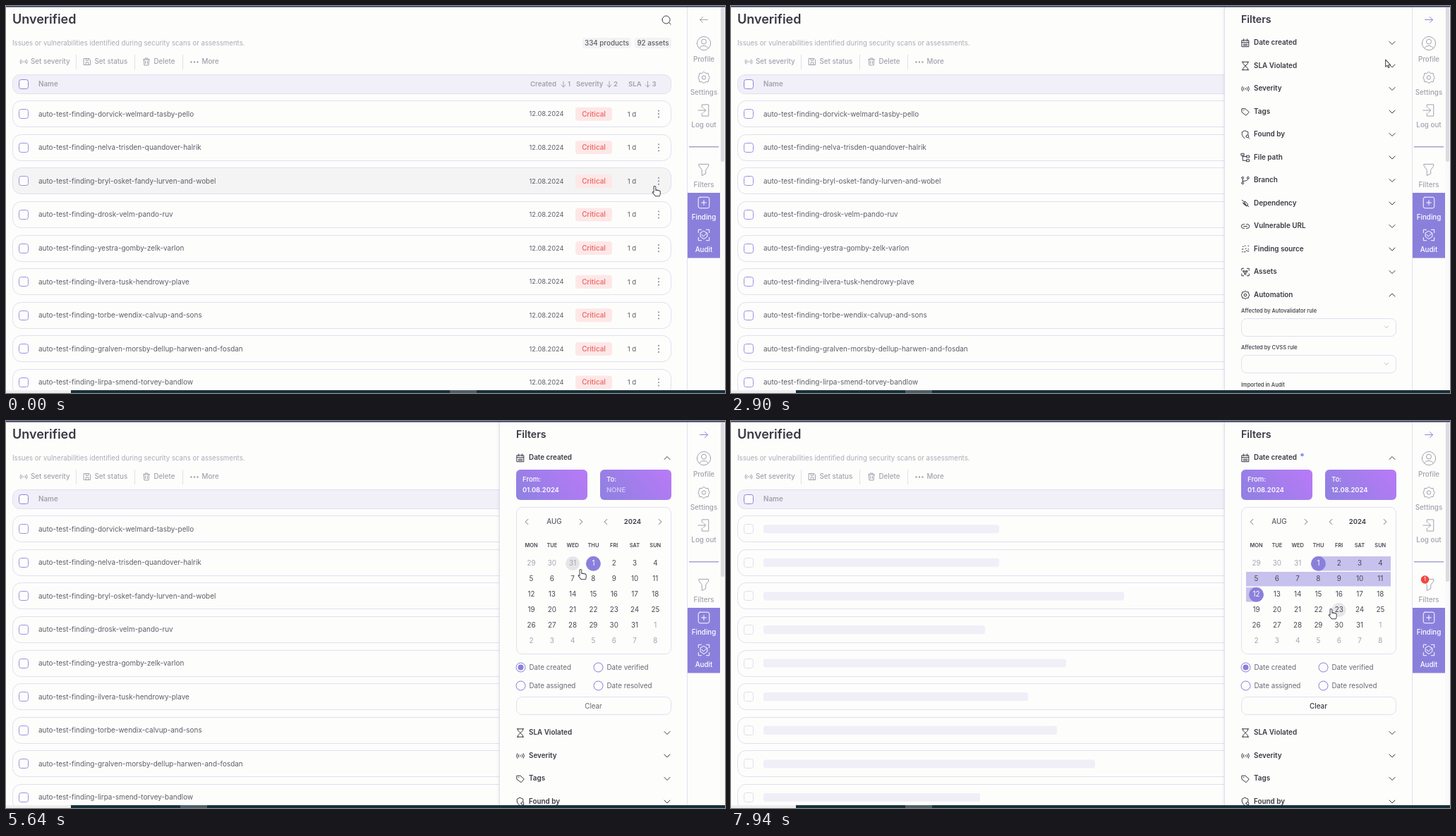
An HTML page with a canvas for the animation above (8 s loop, 1019 by 549 pixels).

```html
<!DOCTYPE html>
<html lang="en">
<head>
<meta charset="utf-8">
<title>Unverified findings</title>
<style>
html, body { margin: 0; width: 100%; height: 100%; overflow: hidden; background: #fdfdfc; }
canvas { display: block; width: 1019px; height: 549px; }
</style>
</head>
<body>
<canvas id="stage"></canvas>
<script>
const W = 1019, H = 549, LOOP = 8000;
const cv = document.getElementById('stage'), c = cv.getContext('2d');
const dpr = window.devicePixelRatio || 1;
cv.width = W * dpr;
cv.height = H * dpr;

const BG = '#fdfdfc', INK = '#3b3843', GREY = '#a3a0ad', PURPLE = '#8a80dc', LINE = '#e1dff0';
const OPEN = 675, EXPAND = 3300, FROM = 5250, TO = 6330, FILL = 6700, LOAD = 6900;

const findings = [
  'dorvick-welmard-tasby-pello', 'nelva-trisden-quandover-halrik',
  'bryl-osket-fandy-lurven-and-wobel', 'drosk-velm-pando-ruv',
  'yestra-gomby-zelk-varlon', 'ilvera-tusk-hendrowy-plave',
  'torbe-wendix-calvup-and-sons', 'gralven-morsby-dellup-harwen-and-fosdan',
  'lirpa-smend-torvey-bandlow'
];
const bones = [380, 380, 557, 360, 475, 421, 462, 516, 353];

const sections = [
  ['Date created', 'calendar'], ['SLA Violated', 'hourglass'], ['Severity', 'signal'],
  ['Tags', 'tag'], ['Found by', 'shield'], ['File path', 'tree'], ['Branch', 'branch'],
  ['Dependency', 'plug'], ['Vulnerable URL', 'link'], ['Finding source', 'dots'],
  ['Assets', 'frame'], ['Automation', 'gear'], ['Assignee', 'tag'], ['Tickets', 'link']
];

const glyphs = {
  calendar: 'M-5-4h10v9.5h-10zM-5-1h10M-2.5-6v3M2.5-6v3M-3 1.5h6M-3 3.5h6',
  hourglass: 'M-5-6h10M-5 6h10M-3.5-6v2.5L3.5 3.5V6M3.5-6v2.5L-3.5 3.5V6',
  signal: 'M-4.5-3.5q-2.5 3.5 0 7M4.5-3.5q2.5 3.5 0 7M-2.5-2q-1.5 2 0 4M2.5-2q1.5 2 0 4M-.6 0h1.2',
  tag: 'M-5-4.5h5l5.500 5-4.500 5-6-4.500zM-2.600-2h.4',
  shield: 'M4 0V-4L-1-6-5-4V0Q-4 4-1 5.500M1 2.500a2 2 0 1 0 4 0a2 2 0 1 0-4 0M4.500 4.500l1.500 1.500',
  tree: 'M-6-6h4v3h-4zM2-3h4v3h-4zM2 3h4v3h-4zM-4-3V4.500h6M-4-1.500h6',
  branch: 'M-5.500-4a1.500 1.500 0 1 0 3 0a1.500 1.500 0 1 0-3 0M2.500-4a1.500 1.500 0 1 0 3 0a1.500 1.500 0 1 0-3 0M-5.500 4a1.500 1.500 0 1 0 3 0a1.500 1.500 0 1 0-3 0M-4-2.500v5M4-2.500Q4 1-4 1',
  plug: 'M-5-5l2 2M5 5l-2-2M-3 0L0-3 4 2 2 4zM-2-3l3 6M-4-1l6 4',
  link: 'M-1.500-3h-1.500a3 3 0 0 0 0 6h1.500M1.500-3h1.500a3 3 0 0 1 0 6h-1.500M-2.500 0h5',
  dots: 'M-4-4h1M-1-5h1M4-5h1M-5 0h2M0-1h1M4 0h1M-2 4h2M3 3h2M-5 4h1M1 2h1',
  frame: 'M-5.500-2.500v-3h3M2.500-5.500h3v3M5.500 2.500v3h-3M-2.500 5.500h-3v-3M-3-2h2v2h-2zM1-2h2v2h-2zM-1 1.500h2v2h-2z',
  gear: 'M0-6L2-4.500 4.500-4.500 5-2 6 0 5 2 4.500 4.500 2 4.500 0 6-2 4.500-4.500 4.500-5 2-6 0-5-2-4.500-4.500-2-4.500zM-2 0a2 2 0 1 0 4 0a2 2 0 1 0-4 0',
  user: 'M-6 0a6 6 0 1 0 12 0a6 6 0 1 0-12 0M-2.200-1.500a2.200 2.200 0 1 0 4.400 0a2.200 2.200 0 1 0-4.400 0M-4 4Q0 0 4 4',
  exit: 'M-2-3v-3h7v12h-7v-3M-6 0h8M-.5-2.500L2 0l-2.500 2.500',
  funnel: 'M-5-6h10v2L2 0v4l-4 2V0L-5-4z',
  plus: 'M-4-6h8q2 0 2 2v8q0 2-2 2h-8q-2 0-2-2v-8q0-2 2-2zM-2.500 0h5M0-2.500v5',
  audit: 'M-5.500-2.500v-3h3M2.500-5.500h3v3M5.500 2.500v3h-3M-2.500 5.500h-3v-3M0-4L3.500-2V1.500L0 4-3.500 1.500V-2zM-2-.5l1.500 2L3-2',
  save: 'M-5-5h8l2 2v8h-10zM-2-5v3h4v-3M-2 5V1h4v4',
  bin: 'M-5-3.500h10M-2-3.500v-2h4v2M-4-3.500l.5 9h7l.5-9M-1.500-1v4M1.500-1v4',
  search: 'M-6-.5a5.500 5.500 0 1 0 11 0a5.500 5.500 0 1 0-11 0M3.500 3.500L6 6',
  arrow: 'M-5.500 0h11M1.500-4l4 4-4 4',
  sort: 'M0-4v8M-3 1l3 3 3-3',
  down: 'M-4-2l4 4 4-4'
};
for (const k in glyphs) glyphs[k] = new Path2D(glyphs[k]);

const hand = new Path2D('M-1 0Q1-1.500 2 .5V6Q3.500 4.500 4.500 6.200 6 5 7 6.800 8.500 6 9 8V11Q9 13.500 7.500 15H1.500L-3 9.500Q-3.500 7.500-1 9z');
const arrowCursor = new Path2D('M0 0V11L2.500 8.800 4.200 12.500 5.800 11.800 4.200 8.200H7.500z');

const clamp = (v) => Math.max(0, Math.min(1, v));
const smooth = (p) => p * p * (3 - 2 * p);

// Eased interpolation through [time, ...values] stops.
function track(stops, t) {
  if (t <= stops[0][0]) return stops[0].slice(1);
  for (let i = 1; i < stops.length; i++) {
    const a = stops[i - 1], b = stops[i];
    if (t < b[0]) {
      const p = smooth((t - a[0]) / (b[0] - a[0]));
      return a.slice(1).map((v, j) => v + (b[j + 1] - v) * p);
    }
  }
  return stops[stops.length - 1].slice(1);
}

const cursorPath = [
  [70, 919, 256], [570, 980, 238], [880, 980, 238], [1350, 895, 198], [2340, 895, 198],
  [3130, 936, 45], [3380, 936, 45], [3640, 871, 71], [4250, 846, 190], [4640, 855, 217],
  [5100, 832, 203], [5400, 832, 203], [6200, 749, 240], [6700, 749, 240], [7500, 850, 267]
];
const scrollPath = [[950, 238], [1900, 35], [2380, 35], [2700, 0]];
const clicks = [[640, 980, 238], [3270, 935, 43], [FROM - 40, 832, 202], [TO - 20, 749, 240]];

function text(s, x, y, size, color, weight = 400, align = 'left') {
  c.font = `${weight} ${size}px Inter, "Open Sans", sans-serif`;
  c.textAlign = align;
  c.fillStyle = color;
  c.fillText(s, x, y + size * 0.35);
}

function box(x, y, w, h, r, fill, stroke, lw = 1) {
  c.beginPath();
  c.roundRect(x, y, w, h, r);
  if (fill) { c.fillStyle = fill; c.fill(); }
  if (stroke) { c.strokeStyle = stroke; c.lineWidth = lw; c.stroke(); }
}

function disc(x, y, r, fill, stroke, lw = 1) {
  c.beginPath();
  c.arc(x, y, r, 0, Math.PI * 2);
  if (fill) { c.fillStyle = fill; c.fill(); }
  if (stroke) { c.strokeStyle = stroke; c.lineWidth = lw; c.stroke(); }
}

function rect(x, y, w, h, fill) {
  c.fillStyle = fill;
  c.fillRect(x, y, w, h);
}

function icon(name, x, y, color, scale = 1, turn = 0, lw = 1) {
  c.save();
  c.translate(x, y);
  c.rotate(turn);
  c.scale(scale, scale);
  c.strokeStyle = color;
  c.lineWidth = lw / scale;
  c.lineCap = c.lineJoin = 'round';
  c.stroke(glyphs[name]);
  c.restore();
}

function kebab(x, y, dx, dy, color, r) {
  for (let i = -1; i < 2; i++) disc(x + i * dx, y + i * dy, r, color);
}

function drawList(t, mx, my) {
  text('Unverified', 9, 19, 18, INK, 600);
  icon('search', 936, 20, INK);
  text('Issues or vulnerabilities identified during security scans or assessments.', 9, 52.5, 9.65, '#acaab6');
  box(817, 45, 69, 15, 4, '#f3f3f3');
  text('334 products', 851.5, 52.5, 9.8, '#5f5c68', 500, 'center');
  box(891, 45, 52, 15, 4, '#f3f3f3');
  text('92 assets', 917, 52.5, 9.8, '#5f5c68', 500, 'center');

  icon('signal', 25, 79, GREY, 0.85);
  text('Set severity', 35, 79, 9.8, GREY, 500);
  icon('save', 115, 79, GREY, 0.9);
  text('Set status', 125.5, 79, 9.8, GREY, 500);
  icon('bin', 199, 79, GREY, 0.9);
  text('Delete', 209.5, 79, 9.8, GREY, 500);
  kebab(267, 79.5, 4.5, 0, GREY, 1.2);
  text('More', 277.5, 79, 9.8, GREY, 500);
  for (const x of [99, 182, 250]) rect(x, 69, 1, 21, '#e2e0e8');

  box(9.5, 97.5, 933, 27, 10, '#f1f0f8', LINE);
  box(18.5, 104.5, 13, 13, 3, BG, PURPLE);
  text('Name', 46, 111, 9.8, GREY, 600);
  [['Created', 743, 790, 1], ['Severity', 808, 855, 2], ['SLA', 882, 909.5, 3]].forEach(([s, x, ax, n]) => {
    text(s, x, 111, 9.6, GREY, 600);
    icon('sort', ax, 111, GREY);
    text(n, ax + 6, 111, 9.6, GREY, 600);
  });

  const loading = t >= LOAD;
  findings.forEach((name, i) => {
    const y = 153.2 + 47.6 * i;
    const hover = !loading && t < OPEN && mx < 942 && Math.abs(my - y) < 19;
    box(9.5, Math.round(y - 19) + 0.5, 933, 37, 12, hover ? '#f4f4f4' : BG, LINE);
    box(18.5, Math.round(y - 7) + 0.5, 13, 13, 3, BG, loading ? '#e0deec' : '#9a92e0');
    if (loading) {
      box(46, y - 6, bones[i] - 46, 12, 3, '#f0eff8');
      return;
    }
    text('auto-test-finding-' + name, 46, y, 9.95, '#5f5c68');
    text('12.08.2024', 741.5, y, 9.3, '#5f5c68');
    box(807, y - 9.5, 52, 19, 4, '#fde8e7');
    text('Critical', 833, y, 9.8, '#ef7070', 600, 'center');
    text('1 d', 887, y, 9.6, '#5f5c68', 400, 'center');
    kebab(925, y, 0, 4.5, '#96939f', 1.1);
  });
}

function chevron(x, y, open, color = INK, scale = 1) {
  icon('down', x, y, color, scale, open ? Math.PI : 0);
}

function drawCalendar(t, mx, my) {
  const from = t >= FROM, to = t >= TO;
  [['From:', 723, from, '01.08.2024'], ['To:', 842, to, '12.08.2024']].forEach(([s, x, set, date]) => {
    const g = c.createLinearGradient(x + 20, 116, x + 85, 62);
    g.addColorStop(0, '#9280e3');
    g.addColorStop(1, '#b67af6');
    box(x, 69, 101, 43, 6, g);
    text(s, x + 9, 83, 9.6, '#fff', 500);
    text(set ? date : 'NONE', x + 9, 97.5, 9.4, set ? '#fff' : 'rgba(255,255,255,.55)', 600);
  });

  box(723.5, 122.5, 219, 208, 8, BG, LINE);
  [[738, 1], [815, -1], [850, 1], [927, -1]].forEach(([x, d]) => icon('down', x, 143, '#77747f', 0.9, d * Math.PI / 2));
  text('AUG', 777, 143, 9.8, '#5f5c68', 500, 'center');
  text('2024', 888, 143, 9.5, INK, 600, 'center');

  const colX = (k) => 744.5 + 29.3 * (k % 7), rowY = (k) => 202 + 22 * Math.floor(k / 7);
  'MON TUE WED THU FRI SAT SUN'.split(' ').forEach((d, i) => text(d, colX(i), 176, 7.4, '#4a4754', 600, 'center'));

  const col = Math.floor((mx - 730) / 29.3), row = Math.floor((my - 191) / 22);
  const over = t > EXPAND + 200 && col >= 0 && col < 7 && row >= 0 && row < 6 ? row * 7 + col : -1;
  const last = to ? 14 : from && over > 3 ? over : 3;

  for (let r = 0; r < 6 && last > 3; r++) {
    const a = Math.max(3, r * 7), b = Math.min(last, r * 7 + 6);
    if (a > b) continue;
    const x0 = a === 3 ? colX(3) : 730, x1 = b === last && b % 7 < 6 ? colX(b) : 935;
    const y = 202 + 22 * r;
    if (t >= FILL) rect(x0, y - 10, x1 - x0, 20.5, '#c7c1ed');
    else {
      rect(x0, y - 10, x1 - x0, 1, '#dcd9f2');
      rect(x0, y + 10, x1 - x0, 1, '#cfcaf0');
    }
  }
  for (let k = 0; k < 42; k++) {
    const x = colX(k), y = rowY(k), on = (k === 3 && from) || (k === 14 && to);
    if (on) disc(x, y + 0.3, 10.5, PURPLE);
    else if (k === over) disc(x, y, 10, '#e6e6e8');
    const inside = k > 2 && k < 34;
    text(new Date(2024, 6, 29 + k).getDate(), x, y, 9.8, on ? '#fff' : inside ? '#4a4754' : '#a5a3b0', 400, 'center');
  }

  [['Date created', 729.5, 349.5], ['Date verified', 839.5, 349.5],
   ['Date assigned', 729.5, 375.5], ['Date resolved', 839.5, 375.5]].forEach(([s, x, y], i) => {
    disc(x, y, 6.5, BG, PURPLE);
    if (!i) disc(x, y, 4, PURPLE);
    text(s, x + 12, y, 9.8, '#6a6773');
  });
  box(723.5, 391.5, 219, 25, 8, BG, LINE);
  text('Clear', 832.5, 404.5, 9.8, t >= FILL ? INK : '#6a6773', t >= FILL ? 500 : 400, 'center');
}

function drawAutomation(y) {
  ['Affected by Autovalidator rule', 'Affected by CVSS rule', 'Imported in Audit'].forEach((s, i) => {
    const top = y + 52.2 * i;
    text(s, 723, top + 23, 7.5, INK, 500);
    box(723.5, Math.round(top + 33) + 0.5, 219, 25, 7, BG, LINE);
    chevron(929, top + 46, false, '#c0becb', 0.65);
  });
  ['Auto-closed by scanner settings', 'Auto-linked by rule', 'Auto-scored by rule'].forEach((s, i) => {
    const cy = y + 230 + 25.5 * i;
    box(723.5, cy - 6, 12, 12, 3, BG, PURPLE);
    text(s, 741, cy, 9.9, '#5f5c68');
  });
}

function drawPanel(t, mx, my) {
  if (t < OPEN) return;
  const slide = 1 - Math.pow(1 - clamp((t - OPEN) / 245), 3);
  const left = 965 - 266 * slide;
  const grow = smooth(clamp((t - EXPAND) / 180));
  c.save();
  c.shadowColor = 'rgba(90,80,150,.18)';
  c.shadowBlur = 4 * dpr;
  rect(left, 0, 965 - left, H, BG);
  c.restore();
  rect(left, 0, 1, H, '#e2e0ec');

  c.save();
  c.beginPath();
  c.rect(left + 20 + 108 * (1 - slide), 0, 965, H);
  c.clip();
  c.translate(0, -track(scrollPath, t)[0]);
  text('Filters', 723, 19.5, 14.2, INK, 600);
  if (grow > 0) {
    c.save();
    c.beginPath();
    c.rect(700, 64, 264, 362 * grow);
    c.clip();
    drawCalendar(t, mx, my);
    c.restore();
  }
  sections.forEach(([s, g], i) => {
    const y = i < 12 ? 52 + 32.5 * i + (i ? 357.5 * grow : 0) : 724 + 32.3 * (i - 12) + 357.5 * grow;
    icon(g, 729, y + 0.5, INK, 0.95);
    text(s, 741, y, 9.9, INK, 600);
    chevron(937, y + 0.5, i === 11 || (i === 0 && t >= EXPAND));
    if (i === 11) drawAutomation(y);
  });
  if (t >= LOAD) disc(809.5, 48, 2.3, '#8b98f5');
  c.restore();
}

function drawSidebar(t, mx, my) {
  rect(965, 0, 54, H, BG);
  rect(965, 0, 1, H, '#e2e0ec');
  const opened = t >= OPEN;
  icon('arrow', 989, 19.5, opened && t > 2500 ? '#8f87d8' : GREY, 1, opened ? 0 : Math.PI);
  [['user', 'Profile', 53, 1.6], ['gear', 'Settings', 101.5, 1.35], ['exit', 'Log out', 148, 1.35]].forEach(([g, s, y, k]) => {
    icon(g, 989, y, GREY, k);
    text(s, 989, y + (y < 60 ? 23 : 20.8), 9.8, GREY, 500, 'center');
  });
  rect(968, 199, 42, 1.5, '#a7a3cb');

  const hover = mx > 966 && my > 219 && my < 265;
  if (hover) rect(966, 219, 46, 46, '#f1f0fa');
  else if (opened && t < 2300) rect(966, 219, 46, 46, '#f3f3f4');
  const tone = hover ? '#a59dde' : GREY;
  icon('funnel', 989, 232.5, tone, 1.35);
  text('Filters', 989, 253.5, 9.8, tone, 500, 'center');
  if (t >= LOAD) {
    disc(983.5, 225, 5.8, '#f0473f');
    text('1', 983.5, 225, 7, '#fff', 500, 'center');
  }
  rect(966, 265, 46, 92.5, PURPLE);
  icon('plus', 989, 279, '#fff', 1.3);
  text('Finding', 989, 300, 9.8, '#fff', 500, 'center');
  icon('audit', 989, 325, '#fff', 1.4);
  text('Audit', 989, 346, 9.8, '#fff', 500, 'center');
  rect(1012, 0, 7, H, '#f9f9f9');
  box(1013, 2, 5, t >= LOAD ? 226 : 219, 2, '#dcdbe2');
}

function drawPointer(t, mx, my) {
  for (const [at, x, y] of clicks) {
    const age = t - at;
    if (age < 0 || age > 420) continue;
    const r = 13 * Math.sin(Math.PI * clamp(age / 270));
    if (r > 3) disc(x, y, r, null, '#e0706c', 1.2);
    disc(x, y, 3, null, '#e8706c', 1.2);
  }
  const onDay = t > EXPAND + 200 && mx > 730 && mx < 935 && my > 191 && my < 323;
  const pointing = t < 950 || onDay || (t > 2800 && mx > 905 && my < 66);
  c.save();
  c.translate(mx, my);
  c.scale(0.92, 0.92);
  c.fillStyle = '#fff';
  c.strokeStyle = '#45434c';
  c.lineWidth = 1.1;
  c.lineJoin = 'round';
  const shape = pointing ? hand : arrowCursor;
  c.fill(shape);
  c.stroke(shape);
  c.restore();
}

function draw(t) {
  const [mx, my] = track(cursorPath, t);
  c.setTransform(dpr, 0, 0, dpr, 0, 0);
  rect(0, 0, W, H, BG);
  drawList(t, mx, my);
  drawPanel(t, mx, my);
  drawSidebar(t, mx, my);
  rect(0, 0, W, 1.6, '#343d60');
  rect(0, 545, W, 4, '#14303a');
  rect(0, 545, 92, 4, '#eeeef0');
  rect(t < 400 ? 629 : 247, 545, 38, 4, '#4d5f66');
  drawPointer(t, mx, my);
}

const start = performance.now();
function tick() {
  draw((performance.now() - start) % LOOP);
  requestAnimationFrame(tick);
}
tick();
</script>
</body>
</html>
```
